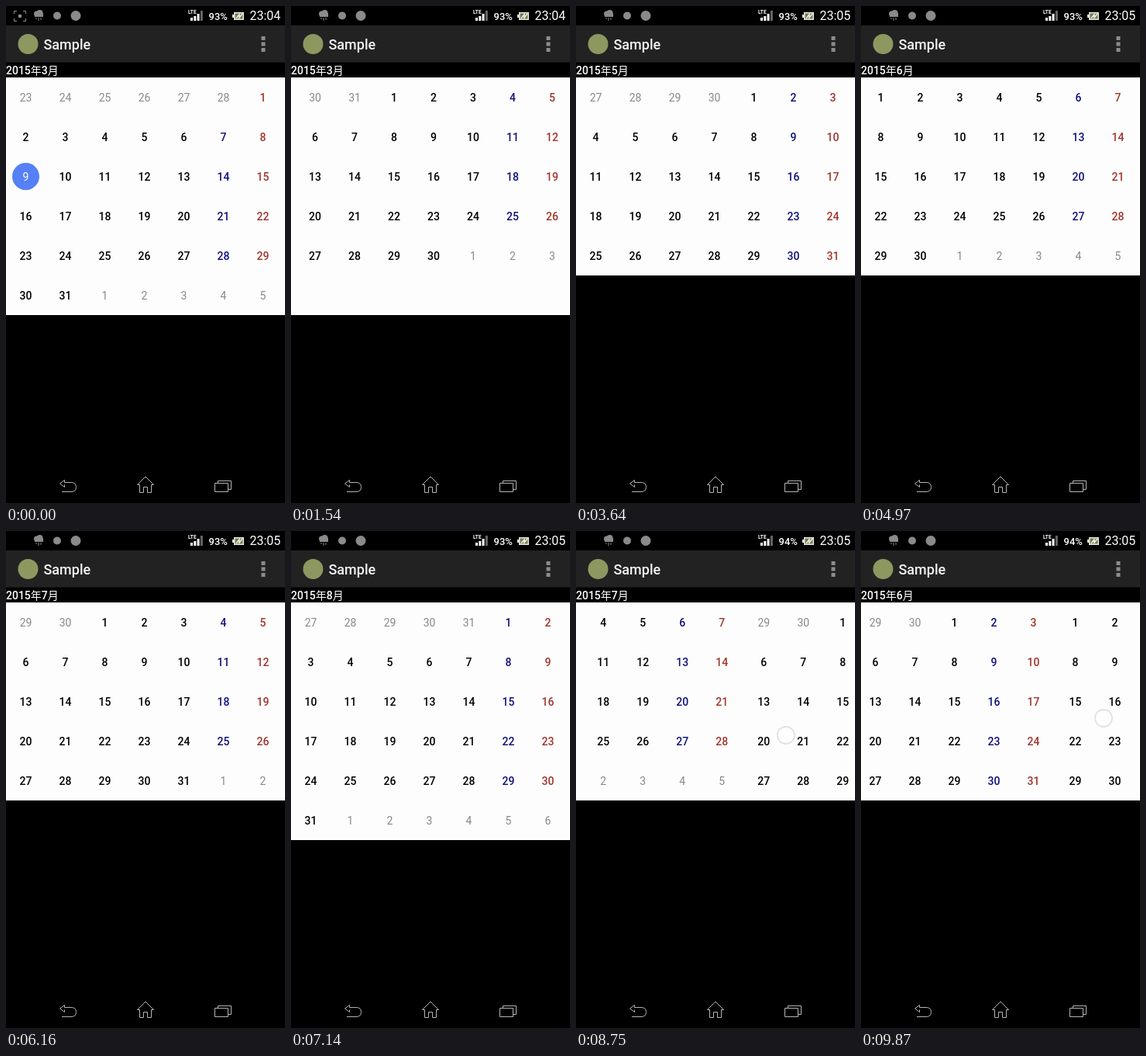
Recreate the animation shown at these times as an HTML page with a canvas. Size 360 by 640 pixels, loop 9940 ms.

```html
<!DOCTYPE html>
<html lang="ja">
<head>
<meta charset="utf-8">
<title>Calendar</title>
<style>
  html, body { margin: 0; width: 100%; height: 100%; overflow: hidden; background: #000; }
  canvas { display: block; width: 360px; height: 640px; }
</style>
</head>
<body>
<canvas width="360" height="640"></canvas>
<script>
const ctx = document.querySelector('canvas').getContext('2d');
const LOOP = 9940, STEP = 70, SETTLE = 420;
const WIDTH = 360, CELL = 51, TOP = 92, SLOP = 8;

// dir +1 pulls in the next month, -1 the previous one
const swipes = [
  { start: 1120, release: 1330, dir: 1, dist: 184, x: 296, y: 250 },
  { start: 2520, release: 2800, dir: 1, dist: 205, x: 300, y: 250 },
  { start: 4200, release: 4550, dir: 1, dist: 215, x: 300, y: 250 },
  { start: 5250, release: 5460, dir: 1, dist: 205, x: 300, y: 250 },
  { start: 6300, release: 6540, dir: 1, dist: 205, x: 300, y: 250 },
  { start: 7280, release: 7490, dir: -1, dist: 215, x: 48, y: 255 },
  { start: 8490, release: 8770, dir: -1, dist: 220, x: 46, y: 263 },
  { start: 9570, release: 9940, dir: -1, dist: 277, x: 54, y: 241 }
];

function pagerAt(t) {
  const pager = { month: 3, offset: 0, touch: null };
  for (const s of swipes) {
    if (t < s.start) break;
    if (t >= s.release + SETTLE) {
      pager.month += s.dir;
    } else if (t >= s.release) {
      const left = 1 - (t - s.release) / SETTLE;
      pager.offset = -s.dir * (WIDTH - (WIDTH - s.dist) * left ** 5);
    } else {
      const u = (t - s.start) / (s.release - s.start);
      const moved = s.dist * u * u * (3 - 2 * u);
      pager.offset = -s.dir * moved;
      pager.touch = { x: s.x - s.dir * (moved + Math.min(SLOP, moved)), y: s.y };
    }
  }
  return pager;
}

function text(str, x, y, size, color, align = 'left', weight = 400) {
  ctx.font = `${weight} ${size}px Roboto, "Noto Sans CJK JP", "Noto Sans CJK", sans-serif`;
  ctx.textAlign = align;
  ctx.fillStyle = color;
  ctx.fillText(str, x, y);
}

function rect(x, y, w, h, color) {
  ctx.fillStyle = color;
  ctx.fillRect(x, y, w, h);
}

function disc(x, y, r, color) {
  ctx.fillStyle = color;
  ctx.beginPath();
  ctx.arc(x, y, r, 0, 7);
  ctx.fill();
}

function stroke(path, color, width = 1) {
  ctx.strokeStyle = color;
  ctx.lineWidth = width;
  ctx.stroke(new Path2D(path));
}

function monthInfo(month) {
  const lead = (new Date(2015, month - 1, 1).getDay() + 6) % 7;
  const days = new Date(2015, month, 0).getDate();
  return { lead, rows: Math.ceil((lead + days) / 7) };
}

function drawMonth(month, left) {
  const { lead, rows } = monthInfo(month);
  for (let i = 0; i < rows * 7; i++) {
    const date = new Date(2015, month - 1, i - lead + 1);
    const col = i % 7;
    const x = left + CELL * (col + 0.5);
    const y = TOP + CELL * (Math.floor(i / 7) + 0.5);
    const outside = date.getMonth() !== month - 1;
    const today = month === 3 && date.getDate() === 9 && !outside;
    let color = '#000';
    if (col === 5) color = '#10107c';
    if (col === 6) color = '#a0352b';
    if (outside) color = '#888';
    if (today) {
      disc(x, y, 17.5, '#5580f6');
      color = '#fff';
    }
    text(date.getDate(), x, y + 5.5, 14, color, 'center', outside || today ? 400 : 500);
  }
}

function drawStatusBar(t) {
  const gray = '#8a8a8a';
  if (t < 700) {
    stroke('M10.5 10V6.5H14M22 6.5H25.5V10M25.5 16V19.5H22M14 19.5H10.5V16', gray);
    rect(16, 11, 4, 4, gray);
  }
  disc(39.5, 10, 3.5, gray);
  disc(43.5, 9, 4, gray);
  rect(37, 9, 11, 5, gray);
  stroke('M39 15V17M42 15V19M45 15V18', gray);
  disc(66, 12.5, 5, gray);
  disc(90, 12.5, 6.5, gray);

  text('LTE', 235, 10, 6.5, '#fff', 'left', 700);
  [4, 6, 9, 13].forEach((h, i) => rect(238 + i * 4.3, 19 - h, 3, h, i < 3 ? '#fff' : '#666'));
  text(t < 8260 ? '93%' : '94%', 261.5, 17.5, 13, '#fff', 'left', 500);
  rect(294, 8, 13, 10, '#e8e8e8');
  rect(292, 11, 2, 4, '#e8e8e8');
  rect(295.5, 9.5, 10, 7, '#737b50');
  stroke('M297 16L301 11V15L305 10', '#f0f0e0', 1.5);
  text(t < 2240 ? '23:04' : '23:05', 314.5, 18, 16, '#fff');
}

function drawActionBar() {
  rect(0, 25, WIDTH, 47, '#222');
  rect(0, 72, WIDTH, 1, '#111');
  disc(28.5, 49, 13, '#8c9860');
  text('Sample', 48.5, 56, 18, '#f4f4f4', 'left', 500);
  for (const y of [39, 46.5, 54]) rect(329.5, y, 5, 5, '#8c8c8c');
}

function drawNavBar() {
  const color = '#b4b4b4';
  stroke('M75.5 613.5V610.5L69.5 615L75.5 619.5V616.5M75.5 613.5H84' +
    'Q90.5 613.5 90.5 619.5T84 625.5H72', color);
  stroke('M169.5 616.5L180 606L190.5 616.5H187.5V626.5H182.5V619.5H177.5V626.5H172.5V616.5Z', color);
  stroke('M269.5 614.5H286.5V625.5H269.5ZM273.5 614V611.5H290.5V622.5H287', color);
}

function draw(t) {
  const { month, offset, touch } = pagerAt(t);
  rect(0, 0, WIDTH, 640, '#000');
  drawStatusBar(t);
  drawActionBar();
  text(`2015年${month}月`, 0, 88, 14, '#fff', 'left', 500);

  const height = monthInfo(month).rows * CELL;
  ctx.save();
  ctx.beginPath();
  ctx.rect(0, TOP, WIDTH, height);
  ctx.clip();
  rect(0, TOP, WIDTH, height, '#fdfdfd');
  for (const k of [-1, 0, 1]) drawMonth(month + k, offset + k * WIDTH);
  ctx.restore();

  if (touch) {
    disc(touch.x, touch.y, 11, 'rgba(255,255,255,.5)');
    ctx.strokeStyle = '#e2e2e5';
    ctx.lineWidth = 1.8;
    ctx.stroke();
  }
  drawNavBar();
}

const begin = performance.now();
function tick() {
  const t = (performance.now() - begin) % LOOP;
  draw(Math.floor(t / STEP) * STEP);
  requestAnimationFrame(tick);
}
tick();
</script>
</body>
</html>
```
